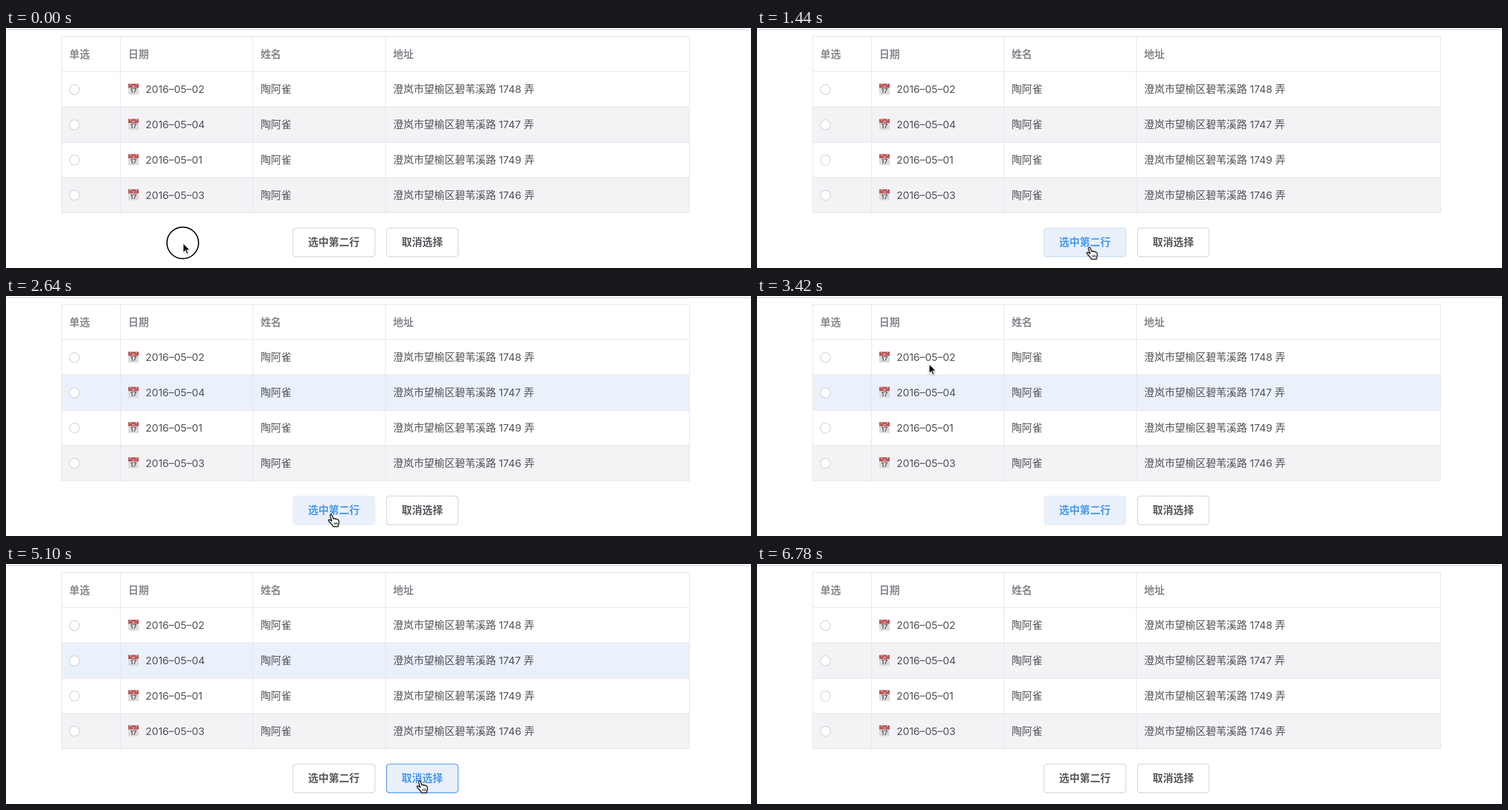
Recreate the animation shown at these times as an HTML page. Size 1280 by 414 pixels, loop 6.84 s.

```html
<!DOCTYPE html>
<html lang="zh-CN">
<head>
<meta charset="utf-8">
<title>单选表格</title>
<style>
html, body { margin: 0; width: 100%; height: 100%; overflow: hidden; background: #fff; }
svg { display: block; width: 100vw; height: 100vh; }
text { font: 17.7px Inter, "Noto Sans CJK SC", "Noto Sans CJK", sans-serif; fill: #505256; }
.head { font-weight: 600; fill: #87898f; }
.grid { fill: none; stroke: #e6e8ed; stroke-width: 1.3; }
.stripe { fill: #f3f3f6; }
.radio { fill: #fff; stroke: #d0d3d9; stroke-width: 1.3; }
.day { font-size: 11px; font-weight: 500; fill: #3c3c3e; text-anchor: middle; }

.btn { color: #56585c; fill: #fff; stroke: #d3d5da; stroke-width: 1.3; }
.btn text { font-weight: 600; fill: currentColor; stroke: none; text-anchor: middle; }

#cursor, #arrow, #hand, #ring, #picked, .btn { animation: 6840ms linear infinite; }
#cursor { animation-name: travel; }
#picked { animation-name: pick; }
#first { animation-name: first; }
#second { animation-name: second; }
#arrow, #hand, #ring { animation-timing-function: step-end; }
#arrow { animation-name: arrow; }
#hand { animation-name: hand; }
#ring { animation-name: ring; fill: none; stroke: #000; stroke-width: 2; }
#arrow, #hand { filter: drop-shadow(0 1px 1px rgba(0, 0, 0, .3)); }

@keyframes travel {
  0% { transform: translate(304px, 371px); }
  6.14% { transform: translate(304px, 371px); animation-timing-function: ease-in-out; }
  14.91%, 17.54% { transform: translate(576px, 383px); }
  21.05% { transform: translate(571.5px, 379px); }
  24.85%, 27.19% { transform: translate(560px, 386px); }
  29.82% { transform: translate(559px, 378px); }
  43.86% { transform: translate(559px, 378px); animation-timing-function: ease-in; }
  49.12% { transform: translate(342px, 193px); }
  51.75% { transform: translate(205px, -30px); animation-timing-function: step-end; }
  65.79% { transform: translate(800px, 420px); animation-timing-function: ease-out; }
  72.81% { transform: translate(711px, 375px); }
  76.32% { transform: translate(711px, 375px); animation-timing-function: ease-in-out; }
  81.29%, 84.21% { transform: translate(895px, 373px); }
  85.09% { transform: translate(893px, 377px); }
  92.1%, 100% { transform: translate(868px, 440px); }
}
@keyframes arrow {
  0%, 45.7%, 78.4%, 100% { opacity: 1; }
  11.4%, 68.42% { opacity: 0; }
}
@keyframes hand {
  0%, 45.7%, 78.4%, 100% { opacity: 0; }
  11.4%, 68.42% { opacity: 1; }
}
@keyframes ring {
  0%, 25.44%, 75.44%, 82.46% { opacity: 1; }
  1.75%, 27.78%, 76.6%, 84.2%, 100% { opacity: 0; }
}
@keyframes pick {
  0%, 27.19%, 79.82%, 100% { fill: #f3f3f6; }
  30.12%, 76.32% { fill: #ebf1fa; }
}
@keyframes first {
  0%, 11.4%, 74.27%, 100% { color: #56585c; fill: #fff; stroke: #d3d5da; }
  12.87%, 25.2% { color: #4799ef; fill: #eaf0f9; stroke: #c5dcf7; }
  25.44%, 27.19% { color: #4799ef; fill: #eaf0f9; stroke: #4799ef; }
  28.65%, 72.81% { color: #4799ef; fill: #eaf0f9; stroke: #e8effa; }
}
@keyframes second {
  0%, 68.42%, 84.21%, 100% { color: #56585c; fill: #fff; stroke: #d3d5da; }
  69.88%, 73.1% { color: #4799ef; fill: #eaf0f9; stroke: #c5dcf7; }
  74.27%, 76.32% { color: #4799ef; fill: #eaf0f9; stroke: #4799ef; }
  77.78%, 82.16% { color: #4799ef; fill: #eaf0f9; stroke: #c5dcf7; }
  83.2% { color: #56585c; fill: #f8f9fb; stroke: #d3d5da; }
}
</style>
</head>
<body>
<svg viewBox="0 0 1280 414" preserveAspectRatio="none">
  <defs>
    <g id="calendar">
      <rect width="18" height="19" rx="1" fill="#dcdcde"/>
      <path d="M0 7.3V1Q0 0 1 0H17Q18 0 18 1V7.3Z" fill="#b95b59"/>
      <path d="M3 1.5h2M13 1.5h2M7 4.6h4" stroke="#ecd2d1" stroke-width="1.4"/>
      <text class="day" x="9" y="16.3">17</text>
    </g>
  </defs>
  <path d="M0 2.8H1280" stroke="#d9dadc" stroke-width="1.5"/>
  <rect class="stripe" id="picked" x="95.5" y="136" width="1079" height="60.8"/>
  <rect class="stripe" x="95.5" y="257.7" width="1079" height="60.8"/>
  <path class="grid" d="M95.6 14.5H1174.4V318.6H95.6ZM95.6 75.3H1174.4M95.6 136.1H1174.4M95.6 197H1174.4M95.6 257.8H1174.4M196.6 14.5V318.6M424.3 14.5V318.6M652 14.5V318.6"/>
  <g id="cells"></g>
  <g class="btn" id="first">
    <rect x="493.1" y="345.1" width="140.8" height="49.4" rx="5"/>
    <text x="563.3" y="376">选中第二行</text>
  </g>
  <g class="btn" id="second">
    <rect x="653.7" y="345.1" width="123" height="49.4" rx="5"/>
    <text x="715.2" y="376">取消选择</text>
  </g>
  <g id="cursor">
    <circle id="ring" cx="-.3" cy="-.4" r="27.2"/>
    <path id="arrow" d="M.3 0V16.6L4.1 13.1L6.7 19.1L9.4 17.9L6.9 12.1H12Z" fill="#000" stroke="#fff" stroke-width="1.2"/>
    <g id="hand" fill="#fff" stroke="#000" stroke-width="1.4" stroke-linejoin="round">
      <path d="M-2 1.4C-2.6 -.6 .4 -1.6 1.2 .4L3.4 6.6C4 5.2 6.2 5.4 6.6 7C7.4 5.8 9.4 6.2 9.7 7.8C10.6 7 12.2 7.6 12.5 9C13.4 12 13 14.5 11.8 17L11.6 19.6H3.2C2.6 17.4 .4 15.6 -1.4 13.4C-2.8 11.8 -4.6 10.6 -4.9 9.2C-4.8 7.6 -2.6 7.6 -1.4 8.8L.8 10.4Z"/>
      <path d="M4.9 12.6L5.2 16.6M7.3 12.4L7.5 16.6M9.7 12.4V16.4" fill="none" stroke-width="1"/>
    </g>
  </g>
</svg>
<script>
const rows = [
  ["2016–05–02", 1748], ["2016–05–04", 1747],
  ["2016–05–01", 1749], ["2016–05–03", 1746]
];
const label = (x, y, s, cls = "") => `<text class="${cls}" x="${x}" y="${y}">${s}</text>`;

const head = [[108.7, "单选"], [210, "日期"], [437.4, "姓名"], [665, "地址"]]
  .map(([x, s]) => label(x, 51.6, s, "head")).join("");

const body = rows.map(([date, lane], i) => {
  const mid = 105.9 + i * 60.8, base = mid + 6.4;
  return `<circle class="radio" cx="117.6" cy="${mid + .3}" r="8.6"/>
    <use href="#calendar" x="210" y="${mid - 10}"/>` +
    label(239.7, base, date) +
    label(437.4, base, "陶阿雀") +
    label(665, base, `澄岚市望榆区碧苇溪路 ${lane} 弄`);
}).join("");

document.getElementById("cells").innerHTML = head + body;
</script>
</body>
</html>
```
